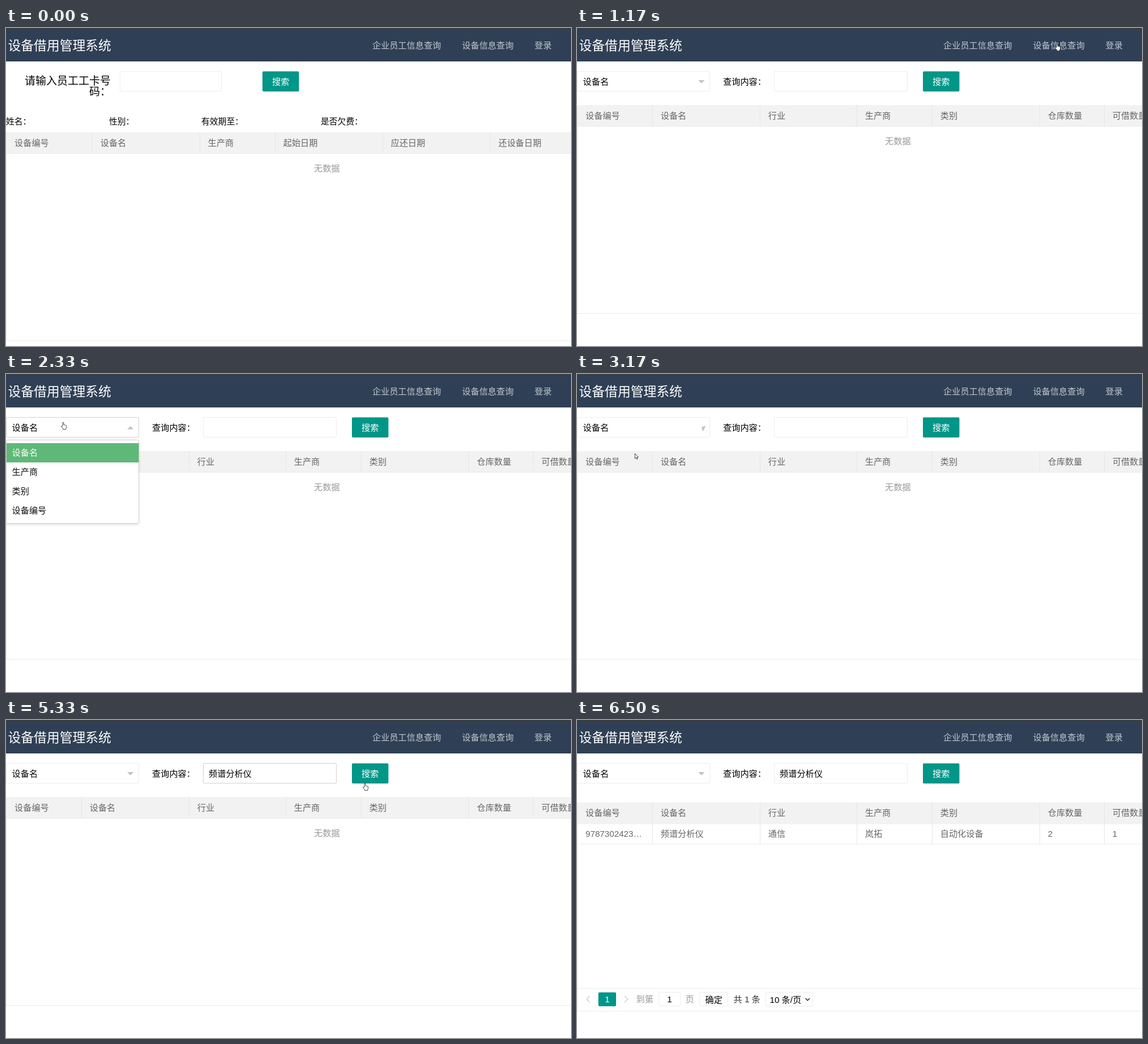
These frames come from a looping animation (998x561 px, 6.84 s). An HTML page:

```html
<!DOCTYPE html>
<html lang="zh-CN">
<head>
<meta charset="utf-8">
<title>设备借用管理系统</title>
<style>
  html, body { margin: 0; width: 100%; height: 100%; overflow: hidden; background: #fff; }
  svg { display: block; width: 998px; height: 561px; }
  text { font: 15.2px "Liberation Sans", "Noto Sans CJK SC", "Noto Sans CJK", sans-serif; white-space: pre; }
  .box { fill: #fff; stroke: #ededed; }
  .box.active { stroke: #d2d2d2; }
  .line { stroke: #ebebeb; fill: none; }
  .teal { fill: #009688; }
  .pointer { fill: #fff; stroke: #333; stroke-width: .9; stroke-linejoin: round; }
  #menu .panel { fill: #fff; stroke: #d2d2d2; filter: drop-shadow(0 2px 2px rgba(0, 0, 0, .12)); }
</style>
</head>
<body>
<svg viewBox="0 0 998 561">
  <g id="nav"></g>
  <g id="staff"></g>
  <g id="device">
    <g id="form"></g>
    <g id="empty"></g>
    <g id="result"></g>
    <path id="edge" d="M-5.7 -5.7H5.7L0 0Z" fill="#c2c2c2"/>
    <g id="menu"></g>
  </g>
  <g id="cursor">
    <path id="arrow" class="pointer" d="M.4 .4V9.2L2.4 7.4 3.8 10.5 5.1 9.9 3.7 6.9H6.6Z"/>
    <path id="hand" class="pointer" d="M-1 7V1.1Q-.9 .2 0 .2T1 1.1V4.6Q2 4 2.7 5Q3.8 4.5 4.3 5.5Q5.5 5.2 5.6 6.4V8.6Q5.6 10.4 4.6 11.4V12.8H-.2V11.6L-3.2 8Q-3.6 6.7 -2.6 6.7Z"/>
    <path id="beam" d="M-2 -4.5H-.6L0 -4 .6 -4.5H2M0 -4V4M-2 4.5H-.6L0 4 .6 4.5H2" fill="none" stroke="#444"/>
  </g>
</svg>
<script>
const $ = id => document.getElementById(id);

// Text is placed by the vertical centre of its line.
const text = (x, mid, str, fill = '#000', size = 15.2, anchor = 'start') =>
  `<text x="${x}" y="${mid + size * .34}" fill="${fill}" text-anchor="${anchor}" style="font-size:${size}px">${str}</text>`;
const rect = (x, y, w, h, attrs) => `<rect x="${x}" y="${y}" width="${w}" height="${h}" ${attrs}/>`;
const box = (x, y, w, h, attrs = '') => rect(x + .5, y + .5, w - 1, h - 1, `rx="1.5" class="box" ${attrs}`);
const line = d => `<path class="line" d="${d}"/>`;
const button = (x, attrs = '') =>
  `<g ${attrs}>${rect(x, 76.5, 64.5, 35.5, 'rx="2" class="teal"')}${text(x + 32.2, 94.5, '搜索', '#fff', 15.2, 'middle')}</g>`;

function table(top, bottom, cols, labels, row) {
  const mid = top + 18.7, head = top + 37, foot = row ? head + 37 : head;
  let out = rect(0, top, 998, 37, 'fill="#f2f2f2"');
  out += line(`M0 ${head + .5}H998M.5 ${top}V${bottom}M0 ${bottom + .5}H998`);
  cols.forEach(x => out += `<path d="M${x + .5} ${top}V${foot}" stroke="#e6e6e6"/>`);
  const starts = [15, ...cols.map(x => x + 14.7)];
  labels.forEach((s, i) => out += text(starts[i], mid, s, '#666'));
  if (!row) return out + text(544, head + 26.7, '无数据', '#999');
  row.forEach((s, i) => out += text(starts[i], head + 18.2, s, '#666'));
  return out + line(`M0 ${foot - .5}H998`);
}

const navInk = '#c1c6cc';
$('nav').innerHTML =
  rect(0, 0, 998, 59, 'fill="#2f4056"') + rect(0, 0, 998, 2, 'fill="#393b3d"') +
  text(3.5, 31, '设备借用管理系统', '#fff', 22.8) +
  text(647, 31, '企业员工信息查询', navInk) +
  text(805.5, 31, '设备信息查询', navInk) +
  text(933.5, 31, '登录', navInk);

$('staff').innerHTML =
  text(33, 94, '请输入员工工卡号', '#000', 19) + text(147, 113, '码：', '#000', 19) +
  box(201, 76, 180, 36) + button(453) +
  [[0, '姓名：'], [182, '性别：'], [345, '有效期至：'], [556, '是否欠费：']]
    .map(([x, s]) => text(x, 165, s, '#000', 14.8)).join('') +
  table(184, 551, [152, 342, 475, 665, 855], ['设备编号', '设备名', '生产商', '起始日期', '应还日期', '还设备日期']);

$('form').innerHTML =
  box(0, 76, 235, 36, 'id="select"') + text(10.5, 95, '设备名') +
  text(258, 94.5, '查询内容：') + box(348, 76, 236, 36, 'id="query"') +
  `<g id="typed">${text(358, 95, '频谱分析仪')}</g>` +
  rect(0, 86, 1, 18, 'id="caret"') + button(611, 'id="search"');

const cols = [133, 323, 494, 627, 817, 931];
const heads = ['设备编号', '设备名', '行业', '生产商', '类别', '仓库数量', '可借数量'];
$('empty').innerHTML = table(136, 503, cols, heads);
$('result').innerHTML =
  table(145.5, 513, cols, heads, ['9787302423…', '频谱分析仪', '通信', '岚拓', '自动化设备', '2', '1']) +
  line('M0 473.5H998') +
  '<path d="M22.5 487L17 492.5L22.5 498M84 487L89.5 492.5L84 498" fill="none" stroke="#ccc" stroke-width="1.4"/>' +
  rect(37.7, 480.4, 31.3, 24.6, 'rx="2" class="teal"') + text(53.5, 492.5, '1', '#fff', 15.2, 'middle') +
  text(104.5, 493, '到第', '#999') + box(144, 480, 39, 25) + text(163.5, 492.5, '1', '#000', 15.2, 'middle') +
  text(191.5, 493, '页', '#999') + box(216, 480, 51, 25) + text(226.5, 493.5, '确定') +
  text(276.5, 492.5, '共 1 条', '#333') + box(333, 480, 84, 25) + text(340.5, 493.5, '10 条/页') +
  '<path d="M403.5 491L407.3 494.7L411 491" fill="none" stroke="#222" stroke-width="1.4"/>';

$('menu').innerHTML =
  rect(.5, 116.5, 234, 147, 'rx="2" class="panel"') + rect(1, 122, 233.5, 34, 'fill="#5fb878"') +
  ['设备名', '生产商', '类别', '设备编号'].map((s, i) => text(10.5, 139.3 + i * 33.8, s, i ? '#111' : '#fff')).join('');

const TICK = 1000 / 6, LOOP = 6840;
const pointer = [
  [0, ''],
  [2, 'arrow', 905, 250], [3, 'arrow', 872, 130], [4, 'hand', 853, 46], [5, 'hand', 850, 33], [6, 'hand', 849, 29],
  [7, 'hand', 848, 27.5],
  [9, 'hand', 760, 22], [10, 'arrow', 430, 62], [11, 'hand', 140, 84], [12, 'hand', 101, 85],
  [15, 'hand', 101, 108], [16, 'hand', 102, 128], [17, 'hand', 102, 136], [18, 'hand', 102, 140],
  [19, 'arrow', 102, 140],
  [20, 'arrow', 160, 134], [21, 'arrow', 290, 114], [22, 'beam', 408, 92], [23, 'beam', 411.5, 89.5],
  [29, 'beam', 450, 90], [30, 'beam', 540, 97], [31, 'arrow', 606, 108], [32, 'hand', 634, 111.5],
  [33, 'hand', 635, 104], [35, 'hand', 635, 100],
  [37, 'arrow', 640, 70], [38, 'arrow', 648, 20], [39, '']
];
const turn = [[0, 0], [12, .13], [13, .9], [14, 1], [19, .64], [20, .05], [21, 0]];
const glow = [[0, 1], [33, .87], [34, .8], [37, .88], [38, .98], [39, 1]];

const at = (keys, k) => keys.filter(e => e[0] <= k).pop().slice(1);
const within = (k, a, b) => k >= a && k < b;
const show = (id, on) => $(id).style.display = on ? '' : 'none';

function draw(t) {
  const k = Math.min(40, Math.floor((t + 4) / TICK));
  const [open] = at(turn, k);
  const [kind, x = 0, y = 0] = at(pointer, k);

  show('staff', k < 6);
  show('device', k >= 6);
  show('empty', k < 34);
  show('result', k >= 34);

  show('menu', within(k, 12, 19));
  $('menu').setAttribute('transform', `translate(0 ${28.5 * (1 - open)})`);
  $('menu').setAttribute('opacity', .3 + .7 * open);
  $('edge').setAttribute('transform', `translate(219.8 ${97.6 - 5.7 * open}) rotate(${180 * open})`);
  $('select').classList.toggle('active', within(k, 11, 19));

  show('typed', k >= 28);
  show('caret', within(k, 24, 27) || within(k, 28, 31));
  $('caret').setAttribute('x', k < 28 ? 358 : 434);
  $('query').classList.toggle('active', within(k, 22, 34));
  $('search').setAttribute('opacity', at(glow, k)[0]);

  ['arrow', 'hand', 'beam'].forEach(id => show(id, id === kind));
  $('cursor').setAttribute('transform', `translate(${x} ${y})`);
}

const start = performance.now();
(function loop() {
  draw((performance.now() - start) % LOOP);
  requestAnimationFrame(loop);
})();
</script>
</body>
</html>
```
